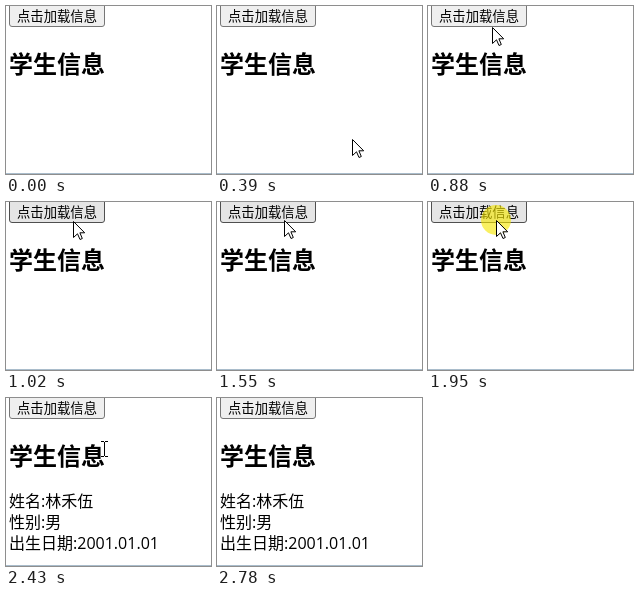
These frames come from a looping animation (205 by 168 pixels, 3180 ms). An HTML page:

```html
<!DOCTYPE html>
<html lang="zh-CN">
<head>
<meta charset="utf-8">
<title>学生信息</title>
<style>
html, body { margin: 0; width: 100%; height: 100%; overflow: hidden; background: #fff; }
svg { display: block; width: 205px; height: 168px; background: #fff; isolation: isolate; }
text { font: 16px "Open Sans", "Noto Sans CJK SC", "Noto Sans CJK", sans-serif; white-space: pre; }
text.label { font-size: 13.333px; }
text.title { font-size: 24px; font-weight: 700; }
#button { fill: #efefef; stroke: #767676; }
#button.hover { fill: #e5e5e5; stroke: #4f4f4f; }
#press { fill: #f5e600; fill-opacity: .62; }
#arrow { fill: #fff; stroke: #000; }
#beam { fill: none; stroke: #fff; mix-blend-mode: difference; }
</style>
</head>
<body>
<svg viewBox="0 0 205 168">
  <rect id="button" x="3.5" y="-3.5" width="95" height="24" rx="2.5"/>
  <text class="label" x="11" y="15">点击加载信息</text>
  <text class="title" x="3" y="67">学生信息</text>
  <g id="info">
    <text x="3" y="109">姓名:林禾伍</text>
    <text x="3" y="130">性别:男</text>
    <text x="3" y="151">出生日期:2001.01.01</text>
  </g>
  <path d="M0 167.5H205" stroke="#a9bccb"/>
  <circle id="press" cx="68" cy="18" r="15"/>
  <path id="arrow" d="M.5 .5V16.5L4.5 12.8L7 18.5L9.3 17.5L6.9 11.8H11.7Z"/>
  <path id="beam" d="M-3 -7.5h3m1 0h3M.5 -7V7M-3 7.5h3m1 0h3"/>
</svg>
<script>
const LOOP = 3180;
const $ = id => document.getElementById(id);

// Pointer stops: time, x, y, shape; each holds until the next.
const stops = [
  [0, 0, 0, ''],
  [390, 135, 133, 'arrow'],
  [460, 99, 91, 'arrow'],
  [530, 73, 58, 'beam'],
  [600, 69, 46, 'beam'],
  [670, 67, 34, 'arrow'],
  [740, 66, 27, 'arrow'],
  [810, 65, 23, 'arrow'],
  [880, 64, 21, 'arrow'],
  [950, 66, 20, 'arrow'],
  [1020, 67, 19, 'arrow'],
  [1550, 67, 18, 'arrow'],
  [1820, 68, 18, 'arrow'],
  [2430, 98, 51, 'beam'],
  [2500, 114, 74, 'arrow'],
  [2570, 132, 101, 'arrow'],
  [2640, 150, 128, 'arrow'],
  [2710, 168, 155, 'arrow'],
  [2780, 0, 0, '']
];

const show = (id, on) => $(id).style.display = on ? '' : 'none';

function draw(now) {
  const t = now % LOOP;
  const [, x, y, shape] = stops.findLast(stop => stop[0] <= t);
  for (const id of ['arrow', 'beam']) {
    show(id, id === shape);
    $(id).setAttribute('transform', `translate(${x} ${y})`);
  }
  $('button').classList.toggle('hover', t >= 950 && t < 2430);
  show('press', t >= 1950 && t < 2020);
  show('info', t >= 2020);
  requestAnimationFrame(draw);
}
draw(0);
</script>
</body>
</html>
```
